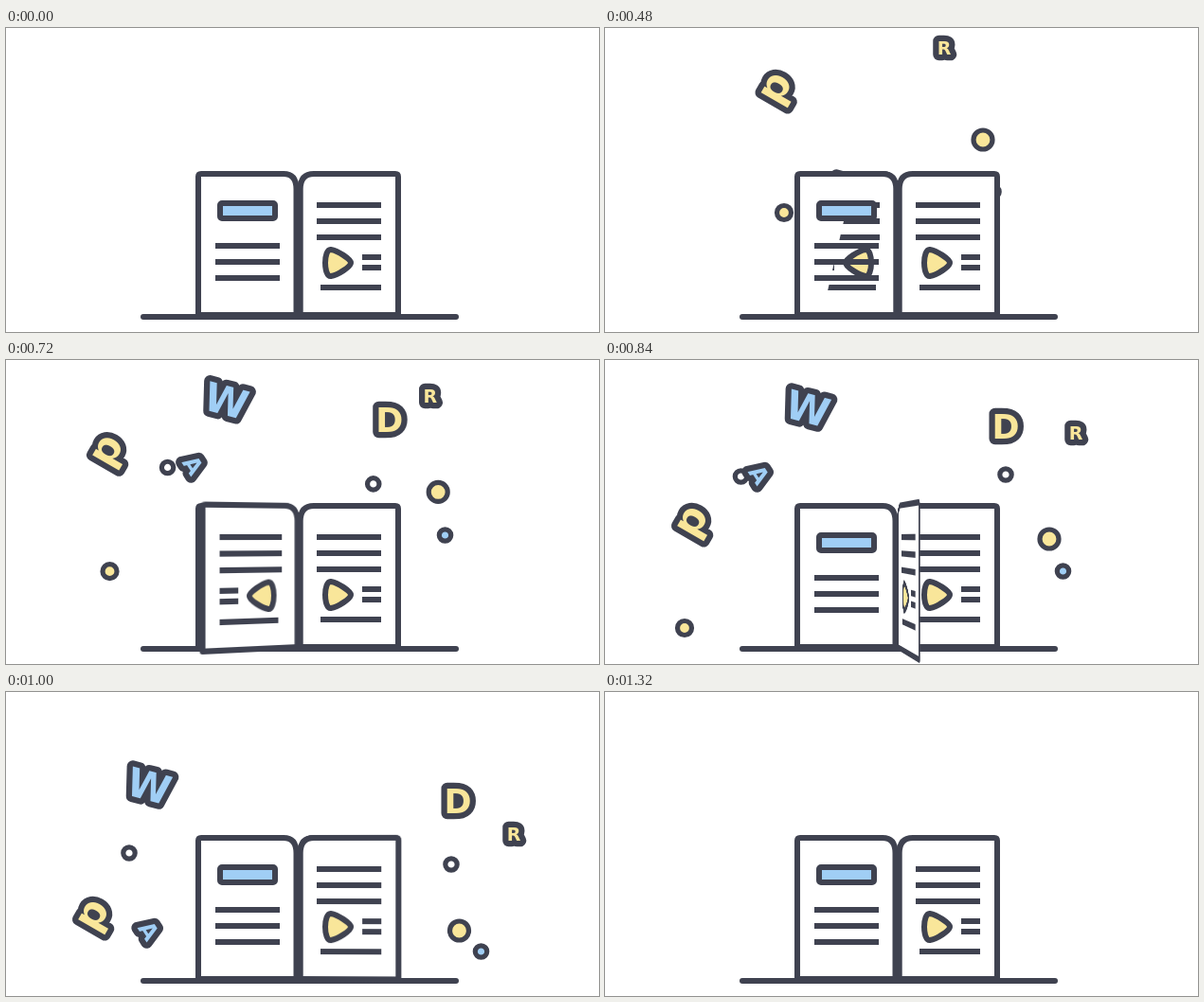
Recreate the animation shown at these times as an HTML page. Size 626x321 px, loop 1360 ms.

```html
<!DOCTYPE html>
<html lang="en">
<head>
<meta charset="utf-8">
<title>Open book</title>
<style>
  html, body { margin: 0; width: 100%; height: 100%; overflow: hidden; background: #fff; }
  #stage { position: relative; width: 100%; height: 100%; overflow: hidden; contain: paint; }
  svg { position: absolute; left: 0; top: 0; width: 626px; height: 321px; overflow: hidden;
        fill: none; stroke: #3f4250; stroke-width: 6; stroke-linejoin: round; }
  text { font-family: "DejaVu Sans", sans-serif; font-weight: bold; text-anchor: middle;
         paint-order: stroke; stroke-width: 12.5; }
  circle { stroke-width: 5.2; }
  .paper { fill: #fff; }
  .blue { fill: #a0cef5; }
  .yellow { fill: #f9e69a; }
  #leaf { transform-origin: 309px 187px; }
  #heading { z-index: 2; }
</style>
</head>
<body>
<div id="stage">
  <svg viewBox="0 0 626 321">
    <g id="bits"></g>
    <path class="paper" d="M203 303V157Q203 154 206 154H293Q306.5 154 306.5 170V303Z"/>
    <g id="page">
      <path class="paper" d="M310.7 303V170Q310.7 154 325 154H411Q414 154 414 157V303Z"/>
      <path d="M328 187h68M328 204h68M328 221h68M376 242h20M376 253h20M332 274h64"/>
      <path class="yellow" d="M343 234C350 235 364 244 364 248C364 252 350 261 343 262C335 263 335 233 343 234Z"/>
    </g>
    <path d="M145 305H475" stroke-linecap="round"/>
  </svg>
  <svg id="leaf" viewBox="0 0 626 321"><use href="#page"/></svg>
  <svg id="heading" viewBox="0 0 626 321">
    <rect class="blue" x="226" y="185" width="58" height="16" rx="2"/>
    <path d="M221 230h68M221 247h68M221 264h68"/>
  </svg>
</div>
<script>
const LOOP = 1360, STEP = 40, FLOOR = 284;
const BOOK = { x: 309, y: 176 };
const KEY_TIMES = [320, 480, 640, 840, 1000];

// Each path lists where a bit passes at the last few KEY_TIMES
const bits = [
  { r: 10, fill: 'yellow', path: [[399, 118], [443.5, 115], [469, 189], [478.5, 252]] },
  { r: 7.5, fill: 'yellow', path: [[189, 195], [131, 195], [84, 283], [66, 380]] },
  { r: 6.2, fill: 'blue', path: [[410, 173], [448, 167], [483.5, 223], [501.5, 274]] },
  { r: 6.2, fill: 'paper', path: [[368, 146], [423, 121], [470, 182]] },
  { r: 6.2, fill: 'paper', path: [[190.5, 119], [143.5, 123], [130, 170]] },
  { char: 'R', size: 19, fill: 'yellow', path: [[318, 45], [358, 21], [414, 20], [497, 77], [536, 150]] },
  { char: 'D', size: 35, fill: 'yellow', path: [[395, 76], [423, 70], [477, 115]] },
  { char: 'W', size: 42, turn: 15, fill: 'blue', path: [[241, 57], [214, 51], [151, 99]] },
  { char: 'p', size: 43, turn: -60, fill: 'yellow', path: [[184.5, 66], [127.5, 59], [96, 173], [96, 238]] },
  { char: 'A', size: 24, turn: 57, fill: 'blue', path: [[221, 123], [163, 121], [151, 252]] }
];

const $ = id => document.getElementById(id);
const clamp = v => Math.min(1, Math.max(0, v));

// Every bit leaves from behind the book and ends in a steep fall
function addEnds(bit) {
  const times = KEY_TIMES.slice(-bit.path.length);
  const [first] = bit.path, [before, last] = bit.path.slice(-2);
  bit.times = [times[0] - 160, ...times, 1320];
  bit.points = [
    [BOOK.x + 0.7 * (first[0] - BOOK.x), BOOK.y],
    ...bit.path,
    [last[0] + 0.25 * (last[0] - before[0]), last[1] + 3.8 * (last[1] - before[1])]
  ];
}

function addNode(bit) {
  const node = document.createElementNS('http://www.w3.org/2000/svg', bit.char ? 'text' : 'circle');
  node.setAttribute('class', bit.fill);
  if (bit.char) {
    const descends = bit.char === 'p';
    node.textContent = bit.char;
    node.setAttribute('font-size', bit.size);
    node.setAttribute('y', bit.size * (descends ? 0.175 : 0.365));
  } else {
    node.setAttribute('r', bit.r);
  }
  bit.node = $('bits').appendChild(node);
}

// Smooth curve through the timed points; null outside their time span
function position({ times, points }, t) {
  const last = points.length - 1;
  if (t < times[0] || t >= times[last]) return null;
  const i = times.findLastIndex(time => time <= t);
  const span = times[i + 1] - times[i], u = (t - times[i]) / span;
  const blend = u * u * (3 - 2 * u);
  return [0, 1].map(axis => {
    const slope = k => {
      const a = Math.max(0, k - 1), b = Math.min(last, k + 1);
      return (points[b][axis] - points[a][axis]) / (times[b] - times[a]) * span;
    };
    return points[i][axis] * (1 - blend) + points[i + 1][axis] * blend +
      slope(i) * u * (1 - u) ** 2 - slope(i + 1) * u * u * (1 - u);
  });
}

function drawBit(bit, t) {
  const p = position(bit, t), visible = p && p[1] < FLOOR;
  bit.node.style.display = visible ? '' : 'none';
  if (visible) bit.node.setAttribute('transform', `translate(${p}) rotate(${bit.turn || 0})`);
}

// The leaf slides out under the heading, then turns back to the right
function drawLeaf(t) {
  const style = $('leaf').style;
  const p = clamp((t - 600) / 450);
  const turned = p ** 3 * (10 - 15 * p + 6 * p * p);
  const emerging = t < 520;
  style.display = t >= 480 && p < 1 ? '' : 'none';
  style.transform = `perspective(980px) rotateY(${-180 * (1 - turned)}deg)`;
  style.clipPath = emerging ? 'polygon(0 0, 319px 0, 393px 321px, 0 321px)' : 'none';
  style.zIndex = emerging ? 1 : 3;
}

bits.forEach(bit => { addEnds(bit); addNode(bit); });
const start = performance.now();

function frame() {
  const t = Math.floor((performance.now() - start) % LOOP / STEP) * STEP;
  bits.forEach(bit => drawBit(bit, t));
  drawLeaf(t);
  requestAnimationFrame(frame);
}
frame();
</script>
</body>
</html>
```
